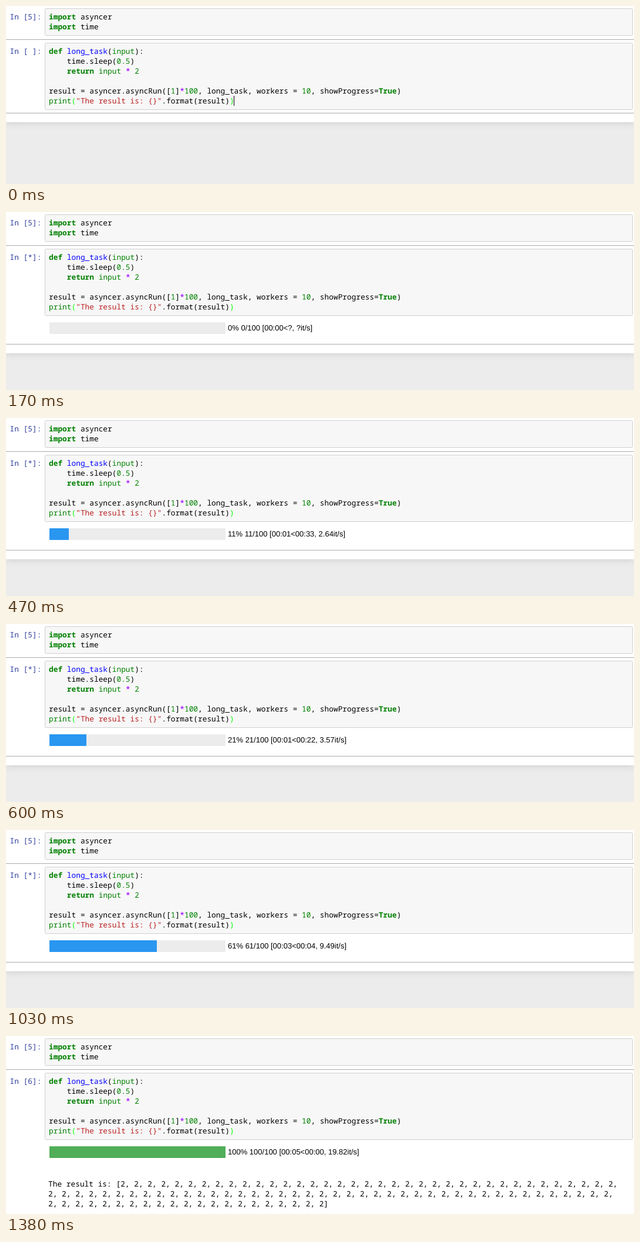
Write an HTML page that moves like this. It is 1070x305 px and loops after 2.48 s.

```html
<!DOCTYPE html>
<html lang="en">
<head>
<meta charset="utf-8">
<title>Notebook progress</title>
<style>
  html, body { margin: 0; width: 100%; height: 100%; overflow: hidden; background: #ececec; }
  #page { position: absolute; top: 0; left: 0; width: 1070px; background: #fff; box-shadow: 0 0 12px 1px rgba(87, 87, 87, .2); }
  svg { position: absolute; top: 0; left: 0; }
  text { font: 12.83px "Noto Sans Mono", monospace; white-space: pre; text-rendering: geometricPrecision; }
  #label { font: 13px "Liberation Sans", Arial, sans-serif; }
  .cell { fill: #f7f7f7; stroke: #cfcfcf; }
  .rule { fill: #ababab; }
  .prompt { fill: #303f9f; }
  .k { fill: #008000; font-weight: bold; }
  .b, .n { fill: #008000; }
  .d { fill: #00f; }
  .o { fill: #a2f; font-weight: bold; }
  .s { fill: #ba2121; }
  .m { fill: #0f0; }
</style>
</head>
<body>
<div id="page"></div>
<svg width="1070" height="305">
  <rect class="cell" x="66.5" y="4.5" width="1001" height="46" rx="2"/>
  <rect class="cell" x="66.5" y="63.5" width="1001" height="114" rx="2"/>
  <rect class="rule" y="57" width="1070" height="1"/>
  <rect class="rule" id="rule" width="1070" height="1"/>

  <text class="prompt" x="6.5" y="23">In [5]:</text>
  <text class="prompt" x="6.5" y="82" id="prompt"></text>

  <text x="73" y="23"><tspan class="k">import</tspan> asyncer</text>
  <text x="73" y="40"><tspan class="k">import</tspan> time</text>

  <text x="73" y="82"><tspan class="k">def</tspan> <tspan class="d">long_task</tspan>(<tspan class="b">input</tspan>):</text>
  <text x="73" y="99">    time.sleep(<tspan class="n">0.5</tspan>)</text>
  <text x="73" y="116">    <tspan class="k">return</tspan> <tspan class="b">input</tspan> <tspan class="o">*</tspan> <tspan class="n">2</tspan></text>
  <text x="73" y="150">result = asyncer.asyncRun([<tspan class="n">1</tspan>]<tspan class="o">*</tspan><tspan class="n">100</tspan>, long_task, workers = <tspan class="n">10</tspan>, showProgress=<tspan class="k">True</tspan>)</text>
  <text x="73" y="167"><tspan class="b">print</tspan><tspan class="m">(</tspan><tspan class="s">"The result is: {}"</tspan>.format(result)<tspan class="m">)</tspan></text>
  <rect id="cursor" x="388" y="154" width="1" height="17"/>

  <g id="progress">
    <rect x="74" y="189" width="300" height="20" rx="1" fill="#ececec"/>
    <rect id="bar" x="74" y="189" height="20" rx="1"/>
    <text id="label" x="378" y="203"></text>
  </g>
  <g id="output"></g>
</svg>
<script>
const LOOP = 2480, START = 40, SHOW = 100, DONE = 1380;
// [time in ms, finished tasks]
const progressSteps = [[0, 0], [370, 1], [470, 11], [570, 21], [700, 31], [850, 41],
  [950, 51], [1030, 61], [1130, 71], [1280, 81], [DONE, 100]];

const $ = id => document.getElementById(id);
const show = (id, on) => $(id).setAttribute('visibility', on ? 'visible' : 'hidden');
const setText = (id, text) => {
  if ($(id).textContent !== text) $(id).textContent = text;
};
const clock = seconds => '00:' + String(Math.floor(seconds)).padStart(2, '0');

const twos = count => '2, '.repeat(count);
const lines = ['The result is: [' + twos(37), twos(42), twos(20) + '2]'];
$('output').innerHTML = lines.map((line, i) => `<text x="72" y="${258 + 17 * i}">${line}</text>`).join('');

function progressLabel(n) {
  const head = `${n}% ${n}/100 `;
  if (n === 0) return head + '[00:00<?, ?it/s]';
  if (n === 100) return head + '[00:05<00:00, 19.82it/s]';
  // Smoothed time per task over batches of ten
  const batch = (n - 1) / 10;
  const rate = 1 / (0.05017 + 0.46922 * 0.7 ** batch);
  return `${head}[${clock((batch + 1) / 2)}<${clock((100 - n) / rate)}, ${rate.toFixed(2)}it/s]`;
}

function draw(now) {
  const t = now % LOOP;
  const running = t >= START, shown = t >= SHOW, done = t >= DONE;
  const n = progressSteps.findLast(([time]) => time <= t)[1];

  setText('prompt', `In [${done ? 6 : running ? '*' : ' '}]:`);
  setText('label', progressLabel(n));
  $('bar').setAttribute('width', 3 * n);
  $('bar').setAttribute('fill', done ? '#50ae58' : '#2996f0');
  $('rule').setAttribute('y', shown ? 226 : 183);
  $('page').style.height = (done ? 400 : shown ? 242 : 199) + 'px';
  show('cursor', !running);
  show('progress', shown);
  show('rule', !done);
  show('output', done);
  requestAnimationFrame(() => draw(performance.now()));
}
draw(0);
</script>
</body>
</html>
```
